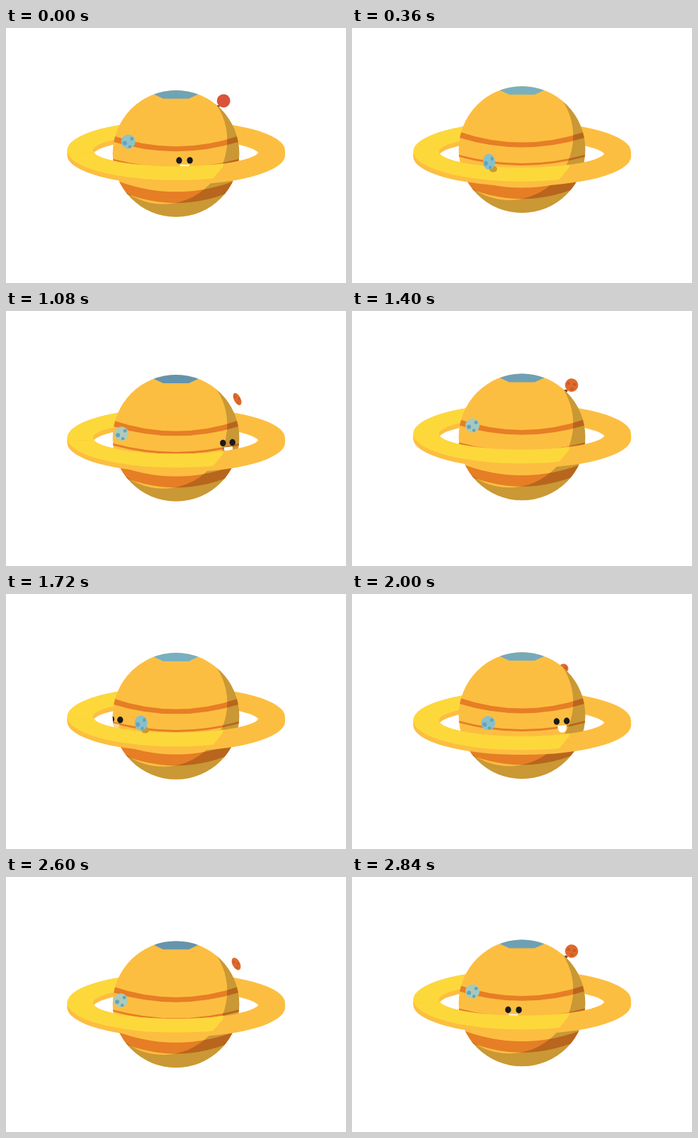
Animation of 480 by 360 pixels, one loop 2.88 s. Source, as an HTML page:

```html
<!DOCTYPE html>
<html lang="en">
<head>
<meta charset="utf-8">
<title>Ringed planet</title>
<style>
  html, body { margin: 0; width: 100%; height: 100%; overflow: hidden; background: #fff; }
  svg { display: block; width: 100%; height: 100%; }
</style>
</head>
<body>
<svg viewBox="0 0 480 360">
  <defs>
    <clipPath id="disc"><circle r="89.4"/></clipPath>
    <clipPath id="front"><rect x="-160" y="3.4" width="320" height="60"/></clipPath>
    <clipPath id="lit"><path d="M-160-60H80L66 23 46 47H-160Z"/></clipPath>
    <g id="ring">
      <path fill="#fcbe41" fill-rule="evenodd" d="M-153.7 0A153.7 42 0 0 1 153.7 0V6.7A153.7 42 0 0 1-153.7 6.7Z
        M-116.2 3.35A117.5 22.5 0 0 1 116.2 3.35A117.5 22.5 0 0 1-116.2 3.35Z"/>
      <path fill="#fdd83b" fill-rule="evenodd" clip-path="url(#lit)" d="M-153.7 0A153.7 42 0 0 1 153.7 0A153.7 42 0 0 1-153.7 0Z
        M-117.5 0A117.5 22.5 0 0 1 117.5 0A117.5 22.5 0 0 1-117.5 0Z"/>
    </g>
  </defs>
  <g class="ring"><use href="#ring"/></g>
  <g id="red">
    <ellipse id="stem" cx="-8" cy="8" rx="2.4" ry="2" fill="#6f4a26"/>
    <g id="redBall">
      <circle id="redBase" r="9.4"/>
      <g id="redSpots" fill="#c85a26">
        <circle cx="-3" cy="-4" r="2"/><circle cx="4" cy="1" r="2.2"/><circle cx="-2" cy="5" r="2"/>
      </g>
    </g>
  </g>
  <g id="planet">
    <g clip-path="url(#disc)">
      <circle r="90" fill="#fcbe41"/>
      <g fill="#e67e25">
        <path d="M-90-25.5Q0 5.5 90-25.5V-17Q0 10.8-90-17Z"/>
        <path d="M-90 7.2Q0 31.8 90 7.2V10Q0 35-90 10Z"/>
        <path d="M-90 36Q0 72 90 36V48.5Q0 91-90 48.5Z"/>
      </g>
      <path id="cap" d="M-40-92H40L31-83.5 18-77.5H-18L-31-83.5Z"/>
      <path fill="#000" fill-opacity=".2" fill-rule="evenodd" d="M-120-120H120V120H-120Z
        M-108.3-19a90.3 90.3 0 0 1 180.6 0a90.3 90.3 0 0 1-180.6 0Z"/>
      <g id="face">
        <g fill="#1c1a17">
          <ellipse id="eyeL" rx="4.2" ry="4.7"/><ellipse id="eyeR" rx="4.2" ry="4.7"/>
        </g>
        <path id="mouth" d="M-6.5 6H6.5C6.5 13 4 16 0 16S-6.5 13-6.5 6Z"/>
      </g>
    </g>
  </g>
  <g class="ring"><g clip-path="url(#front)"><use href="#ring"/></g></g>
  <ellipse id="shade" rx="5.5" ry="4.5" fill="#c99a32"/>
  <g id="blue">
    <circle id="blueBase" r="10"/>
    <g fill="#65a3b6">
      <circle cx="-5" cy="2" r="3"/><circle cx="2" cy="7" r="2.2"/><circle cx="5" cy="-4" r="2.4"/>
    </g>
  </g>
</svg>
<script>
  const LOOP = 2880, BOB = 1440, SPIN = 960, STEP = 40;
  const $ = id => document.getElementById(id);
  const rings = document.querySelectorAll('.ring');
  const put = (el, x, y, extra = '') => el.setAttribute('transform', `translate(${x} ${y})${extra}`);
  const show = (el, on) => el.setAttribute('visibility', on ? 'inherit' : 'hidden');
  const wave = (t, peak, n = 1) => Math.cos(2 * Math.PI * n * (t - peak) / BOB);
  const clamp = v => Math.max(0, Math.min(1, v));
  const mix = (a, b, k) => `rgb(${a.map((v, i) => Math.round(v + (b[i] - v) * k))})`;

  function drawFace(t) {
    const a = 2 * Math.PI * (t + 20) / SPIN, s = Math.sin(a), c = Math.cos(a);
    const half = 7.6 * (0.7 + 0.3 * c), tilt = -1.2 * s;
    show($('face'), c > 0.03);
    put($('face'), 92 * s, 1.7 + 8 * c);
    put($('eyeL'), -half, -tilt / 2);
    put($('eyeR'), half, tilt / 2);
    put($('mouth'), 0, 0, ` rotate(${-8 * s}) scale(${0.85 + 0.15 * c} 1)`);
    $('mouth').setAttribute('fill', mix([255, 255, 255], [251, 216, 150], clamp(-s * 2 - 0.6)));
  }

  function drawRed(t) {
    const w = wave(t, 1075), out = Math.max(0, w), p = t % BOB;
    const size = 1 + 0.55 * Math.min(0, w + 0.1), fresh = t < 200;
    put($('red'), 309 + 16 * w + 1.5 * wave(t, 1075, 2),
      110.2 + 6.5 * wave(t, 1090) + 7.7 * wave(t, 1090, 2));
    put($('redBall'), 0, 0, ` rotate(-27) scale(${size * (1 - 0.5 * out * out)} ${size})`);
    $('redBase').setAttribute('fill', fresh ? '#d9533b' : '#de6a2b');
    show($('redSpots'), !fresh);
    show($('stem'), p > 1240 || p < 100);
  }

  function drawBlue(t) {
    const x = 178.2 + 16.2 * wave(t, 440);
    const y = 171.8 + 8.2 * wave(t, 420) + 10.7 * wave(t, 420, 2);
    const near = clamp(1 - Math.abs(t % BOB - 350) / 180);
    put($('blue'), x, y, ` scale(${1 - 0.15 * near} ${1 + 0.12 * near})`);
    $('blueBase').setAttribute('fill', mix([134, 192, 205], [172, 203, 187], clamp(4 * wave(t, 1150) - 1)));
    put($('shade'), x + 6, y + 10);
    show($('shade'), near > 0.1);
  }

  function draw(t) {
    put($('planet'), 240, 175.5 - 4.3 * wave(t, 460));
    rings.forEach(r => put(r, 240.2, 176.8 + 4.6 * wave(t, 840)));
    $('cap').setAttribute('fill', mix([100, 147, 171], [120, 176, 192], 0.5 + 0.5 * wave(t, 340)));
    drawFace(t);
    drawRed(t);
    drawBlue(t);
  }

  const start = performance.now();
  function tick() {
    const t = (performance.now() - start) % LOOP;
    draw(Math.floor(t / STEP) * STEP);
    requestAnimationFrame(tick);
  }
  draw(0);
  requestAnimationFrame(tick);
</script>
</body>
</html>
```
